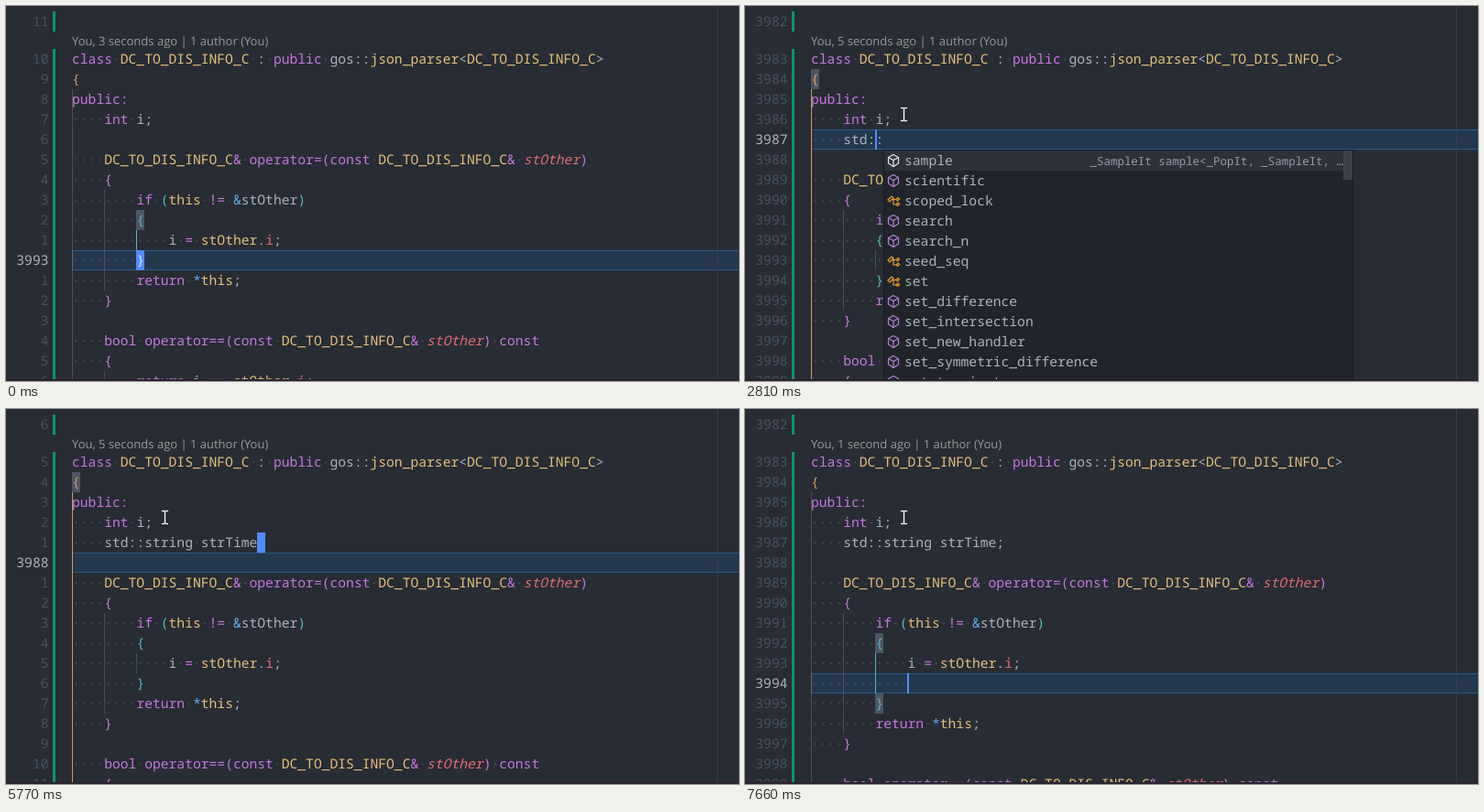
Write an HTML page with a canvas that moves like this. It is 800 px wide and 410 px high and loops after 8000 ms.

```html
<!DOCTYPE html>
<html lang="en">
<head>
<meta charset="utf-8">
<title>Editor</title>
<style>
  html, body { margin: 0; width: 800px; height: 410px; overflow: hidden; background: #282c34; }
  canvas { display: block; }
</style>
</head>
<body>
<canvas id="stage" width="800" height="410"></canvas>
<script>
const ctx = document.getElementById('stage').getContext('2d');
const LOOP = 8000, LEFT = 72, CW = 8.797, LH = 22, FIRST = 3982;
const MONO = '"Noto Sans Mono", "DejaVu Sans Mono", monospace';
const SIZE = `14.66px ${MONO}`, FONT = '500 ' + SIZE;
const FG = '#abb2bf', PURPLE = '#c678dd', YELLOW = '#e5c07b', RED = '#e06c75', BLUE = '#61afef', CURSOR = '#528bff';
const DEPTH = ['#d19a66', '#c678dd', '#56b6c2'];

const BASE = `
class DC_TO_DIS_INFO_C : public gos::json_parser<DC_TO_DIS_INFO_C>
{
public:
    int i;

    DC_TO_DIS_INFO_C& operator=(const DC_TO_DIS_INFO_C& stOther)
    {
        if (this != &stOther)
        {
            i = stOther.i;
        }
        return *this;
    }

    bool operator==(const DC_TO_DIS_INFO_C& stOther) const
    {
        return i == stOther.i;`.split('\n');

// Typing: one time per character
const TYPED = 'std::string strTime;';
const KEYS = [2020, 2230, 2410, 2690, 2810, 3150, 4340, 4390, 4440, 4490,
              4540, 4580, 4620, 4660, 4700, 4730, 4910, 5030, 5150, 5300];
const OPEN1 = 1780, ESC = 5550, OPEN2 = 7390;

// Cursor: [time, row, column]
const MOVES = [
  [0, 11, 8], [70, 10, 9], [160, 9, 8], [250, 8, 9], [340, 7, 4], [430, 6, 9], [520, 5, 0], [610, 4, 9],
  [OPEN1, 5, 4], ...KEYS.map((t, i) => [t, 5, 5 + i]), [ESC, 5, 23],
  [5770, 6, 0], [6030, 7, 23], [6530, 8, 4], [6620, 9, 23], [6710, 10, 8], [6800, 11, 23], [OPEN2, 12, 12]
];

// Bulb: [from, to, row]
const BULBS = [[860, 2690, 4], [3150, 4340, 5], [6160, 7200, 7]];
const LENS = [[0, 'You, 3 seconds ago | 1 author (You)'], [1230, 'You, 5 seconds ago | 1 author (You)'],
              [6090, '…'], [7140, 'You, 1 second ago | 1 author (You)']];

// Suggestions: first letter is the icon kind
const GLOBAL = ('vS vs ks11 ns11n_example ks12 ks13 ks14 vs1_ ks21 ks22 ks23 ks24 vst vstBuffer nstd vstdCount kstdIn ' +
  'kstdOut kstdErr vstOther vstState vstStation vstStart vstrt vstrTerminalStationID vstrTerminateTime vstrText ' +
  'vstrTingTianDepotGroup vstrTitle vstrTrainBrdGroupID vstrTrainCrewNumber vstrTrainDefaultGroup ' +
  'vstrTrainDownLineBrdGroup vstrTrainDownLineGroup vstrTrainEmergencyGroup vstrTrainTime vstrArriveTime ' +
  'vstrBeginTime vstrDepartTime vstrEndTime vstrUpdateTime').split(' ');
const STD = ('msample mscientific cscoped_lock msearch msearch_n cseed_seq cset mset_difference mset_intersection ' +
  'mset_new_handler mset_symmetric_difference mset_terminate mstable_sort cstack mstatic_pointer_cast mstod mstoi ' +
  'mstrcat mstrcmp mstrcpy mstreambuf cstring cstring_view mstrlen mstrtod').split(' ');
const DETAIL = { S: 'DWORD S[32]', sample: '_SampleIt sample<_PopIt, _SampleIt, …', strt: 'OCIAnyData * strt' };

const xOf = col => LEFT + col * CW;
const yOf = row => row ? 36 + LH * row : 17;
const clamp = v => Math.max(0, Math.min(1, v));
const lastAt = (list, t) => list.findLastIndex(e => e[0] <= t);

function rect(x, y, w, h, color) {
  ctx.fillStyle = color;
  ctx.fillRect(x, y, w, h);
}
function text(s, x, y, color, font = FONT, align = 'left') {
  ctx.font = font;
  ctx.fillStyle = color;
  ctx.textAlign = align;
  ctx.fillText(s, x, y);
}
function path(points, color, close) {
  ctx.beginPath();
  for (let i = 0; i < points.length; i += 2) ctx.lineTo(points[i], points[i + 1]);
  if (close) ctx.closePath();
  ctx.strokeStyle = color;
  ctx.lineWidth = 1.2;
  ctx.stroke();
}

function linesAt(t) {
  const lines = BASE.slice();
  if (t >= OPEN1) lines.splice(5, 0, '    ' + TYPED.slice(0, KEYS.filter(k => k <= t).length));
  if (t >= OPEN2) lines.splice(12, 0, ' '.repeat(12));
  return lines;
}

function bracketPairs(lines) {
  const stack = [], pairs = [];
  lines.forEach((line, r) => [...line].forEach((ch, c) => {
    if ('({'.includes(ch)) {
      const pair = { open: [r, c], close: [99, c], depth: stack.length };
      stack.push(pair);
      pairs.push(pair);
    } else if (')}'.includes(ch)) stack.pop().close = [r, c];
  }));
  return pairs;
}

const TOKEN = /public:|\w+|[=!]+|\s|./g;
function tokenColor(tok, line, at) {
  if (/^(class|public:?|int|bool|const|operator|if|return)$/.test(tok)) return PURPLE;
  if (/^(DC_|json_parser|this)/.test(tok)) return YELLOW;
  if (tok === 'stOther') return line[at + 7] === '.' ? YELLOW : line[at - 1] === ' ' ? RED : FG;
  if (tok === 'i' && line[at - 1] === '.') return RED;
  if (tok === '*' || (tok === '&' && line[at + 1] === 's')) return BLUE;
  return /^[=!&]/.test(tok) ? PURPLE : FG;
}

function drawLine(line, row, brackets) {
  const y = yOf(row);
  for (const m of line.matchAll(TOKEN)) {
    const tok = m[0], at = m.index, x = xOf(at);
    if (tok === ' ') {
      rect(x + 3.6, y - 0.5, 1.7, 1.7, '#484e5a');
      continue;
    }
    const color = brackets[row + ',' + at] || tokenColor(tok, line, at);
    text(tok, x, y + 5, color, (color === RED && tok === 'stOther' ? 'italic ' : '') + FONT);
  }
}

function drawIcon(kind, x, y, selected) {
  const color = selected ? '#e6e9ee' : { v: '#75beff', m: '#b180d7', c: '#ee9d28', k: '#b4bac5', n: '#b4bac5' }[kind];
  if (kind === 'n') return text('{}', x, y + 4.5, color, `12px ${MONO}`, 'center');
  if (kind === 'k') {
    path([x - 6.5, y - 5, x + 6.5, y - 5, x + 6.5, y + 5, x - 6.5, y + 5], color, true);
    for (const d of [-2, 0.5, 3]) path([x - 3.5, y + d - 0.5, x + 3.5, y + d - 0.5], color);
  } else if (kind === 'c') {
    path([x - 6, y - 1, x - 2, y - 5, x, y - 3, x - 4, y + 1], color, true);
    path([x - 2, y - 1.5, x + 3, y - 1.5], color);
    path([x, y - 1.5, x, y + 4, x + 3, y + 4], color);
    for (const d of [-1.5, 4]) path([x + 3, y + d, x + 5, y + d - 2, x + 6.5, y + d - 0.5, x + 4.5, y + d + 1.5], color, true);
  } else if (kind === 'm') {
    path([x, y - 6.5, x + 5.5, y - 3.5, x + 5.5, y + 3, x, y + 6.5, x - 5.5, y + 3, x - 5.5, y - 3.5], color, true);
    path([x - 5.5, y - 3.5, x, y - 0.5, x + 5.5, y - 3.5], color);
    path([x, y - 0.5, x, y + 6.5], color);
  } else {
    path([x - 6.5, y - 1, x + 1, y - 5, x + 6.5, y - 2.5, x + 6.5, y + 1.5, x - 1, y + 5.5, x - 6.5, y + 2.5], color, true);
    path([x - 6.5, y - 1, x - 1, y + 1.5, x + 6.5, y - 2.5], color);
    path([x - 1, y + 1.5, x - 1, y + 5.5], color);
  }
}

function matchParts(name, query) {
  if (name.toLowerCase().startsWith(query.toLowerCase())) return [name.slice(0, query.length), name.slice(query.length), ''];
  const tail = query.slice(3).length, end = name.length - 4;
  return ['str', name.slice(3, end), name.slice(end, end + tail), name.slice(end + tail)];
}

function drawPopup(typed, col) {
  const [, scope, query] = typed.match(/(std::)?(\w*)$/);
  if (!query && !scope) return;
  const fits = item => {
    const name = item.slice(1);
    return name.toLowerCase().startsWith(query.toLowerCase()) || (/^strTim/.test(query) && name.endsWith('Time'));
  };
  const items = (scope ? STD : GLOBAL).filter(fits).slice(0, 12);
  if (!items.length) return;
  const x = Math.round(xOf(col)), top = 157, w = query ? 431 : 513, h = items.length * LH + 3;
  rect(x, top, w, h, '#181a1f');
  rect(x + 1, top + 1, w - 2, h - 2, '#21252b');
  rect(x + 1, top + 1, w - 2, LH, '#2c313a');
  items.forEach((item, i) => {
    const y = 169 + i * LH, name = item.slice(1);
    drawIcon(item[0], x + 11, y, i === 0);
    let c = 0;
    matchParts(name, query).forEach((part, p) => {
      const bold = p % 2 === 0;
      text(part, x + 23 + c * CW, y + 5, bold ? '#ffffff' : FG, bold ? 'bold ' + SIZE : FONT);
      c += part.length;
    });
  });
  const detail = DETAIL[items[0].slice(1)];
  if (detail) text(detail, x + w - 11, 174, '#969daa', `12.46px ${MONO}`, 'right');
  const thumb = items.length < 12 ? 0 : scope ? 32 : query.startsWith('strT') ? 60 : 0;
  rect(x + w - 11, top + 1, 10, thumb, '#3b404a');
}

function drawBulb(row) {
  const y = yOf(row) - 5;
  ctx.fillStyle = '#ffcc00';
  ctx.beginPath();
  ctx.arc(80.5, y, 5, 0, 7);
  ctx.fill();
  rect(78, y + 3, 5, 4, '#ffcc00');
  rect(78, y + 5, 5, 1, '#7a6a20');
  rect(78, y + 7, 5, 1.5, '#c9a21a');
}

function drawMouse() {
  const beam = [[170, 111, 3, 1], [174, 111, 3, 1], [173, 112, 1, 13], [170, 125, 3, 1], [174, 125, 3, 1]];
  for (const [x, y, w, h] of beam) rect(x - 1, y - 1, w + 2, h + 2, '#000');
  for (const [x, y, w, h] of beam) rect(x - 0.3, y - 0.3, w + 0.6, h + 0.6, '#fff');
}

function drawCursor(t, move, lines, insert) {
  const [start, row, col] = MOVES[move];
  const prev = MOVES[Math.max(0, move - 1)];
  const age = t - start;
  const k = clamp((insert ? age : age - 60) / 60);
  const mix = (a, b) => a + (b - a) * k;
  const x = mix(xOf(prev[2]), xOf(col)), y = mix(yOf(prev[1]), yOf(row)) - 11;
  ctx.globalAlpha = 1 - clamp((age - 570) / 200);
  if (insert) rect(Math.floor(x), y, 2, LH, CURSOR);
  else {
    rect(Math.round(x), y, 9, LH, CURSOR);
    text(lines[row][col] || '', x, y + 16, '#dfe6f5');
  }
  ctx.globalAlpha = 1;
}

function draw(t) {
  const lines = linesAt(t), pairs = bracketPairs(lines);
  const move = lastAt(MOVES, t), [, row, col] = MOVES[move];
  const insert = (t >= OPEN1 && t < ESC) || t >= OPEN2;
  const order = p => p[0] * 200 + p[1];
  const here = row * 200 + col;
  const around = pairs.filter(p => order(p.open) <= here && order(p.close) >= here);
  const match = around.at(-1);
  const block = around.findLast(p => p.close[0] > p.open[0]);
  const brackets = {};

  rect(0, 0, 800, 410, '#282c34');
  rect(LEFT, yOf(row) - 11, 728, LH, '#2e5a84');
  rect(LEFT + 1, yOf(row) - 10, 727, LH - 2, '#24374d');
  rect(776, 0, 1, 410, '#383d47');

  for (const p of pairs) {
    const color = DEPTH[p.depth % 3];
    brackets[p.open] = brackets[p.close] = color;
    if (p.close[0] === p.open[0]) continue;
    const top = yOf(p.open[0]) + 11, bottom = Math.min(410, yOf(p.close[0]) - 11);
    ctx.globalAlpha = p === block ? 1 : 0.3;
    rect(Math.round(xOf(p.close[1])), top, 1, bottom - top, color);
    ctx.globalAlpha = 1;
  }
  if (match) for (const [r, c] of [match.open, match.close])
    if (r < lines.length) rect(Math.round(xOf(c)), yOf(r) - 11, 9, LH, '#4d5565');

  lines.forEach((line, r) => {
    drawLine(line, r, brackets);
    const label = insert || r === row ? FIRST + r : Math.abs(r - row);
    text(label, 46.5, yOf(r) + 5, r === row ? FG : '#495162', FONT, 'right');
  });
  rect(51, 6, 3, LH, '#0f9468');
  rect(51, 47, 3, 363, '#0f9468');
  text(LENS[lastAt(LENS, t)][1], LEFT, 43, '#999999', '13px "Open Sans", "Noto Sans", sans-serif');

  if (t >= 3150 && t < 4340) text('ample', xOf(10), yOf(5) + 5, '#6f7886', 'italic ' + FONT);
  if (t >= 3400 && t < 4340) {
    rect(151, 135, 9, LH, 'rgba(130,150,180,.28)');
    ctx.strokeStyle = '#7f9cc4';
    ctx.lineWidth = 1;
    ctx.strokeRect(151.5, 135.5, 8, LH - 1);
  }
  for (const [from, to, r] of BULBS) if (t >= from && t < to) drawBulb(r);
  drawCursor(t, move, lines, insert);
  if (t >= KEYS[0] && t < KEYS.at(-1)) drawPopup(lines[5].trimStart(), col);
  if (t >= 860) drawMouse();
  rect(0, 408, 800, 2, '#29232f');
}

ctx.textRendering = 'geometricPrecision';
const begin = performance.now();
function tick() {
  draw((performance.now() - begin) % LOOP);
  requestAnimationFrame(tick);
}
tick();
</script>
</body>
</html>
```
